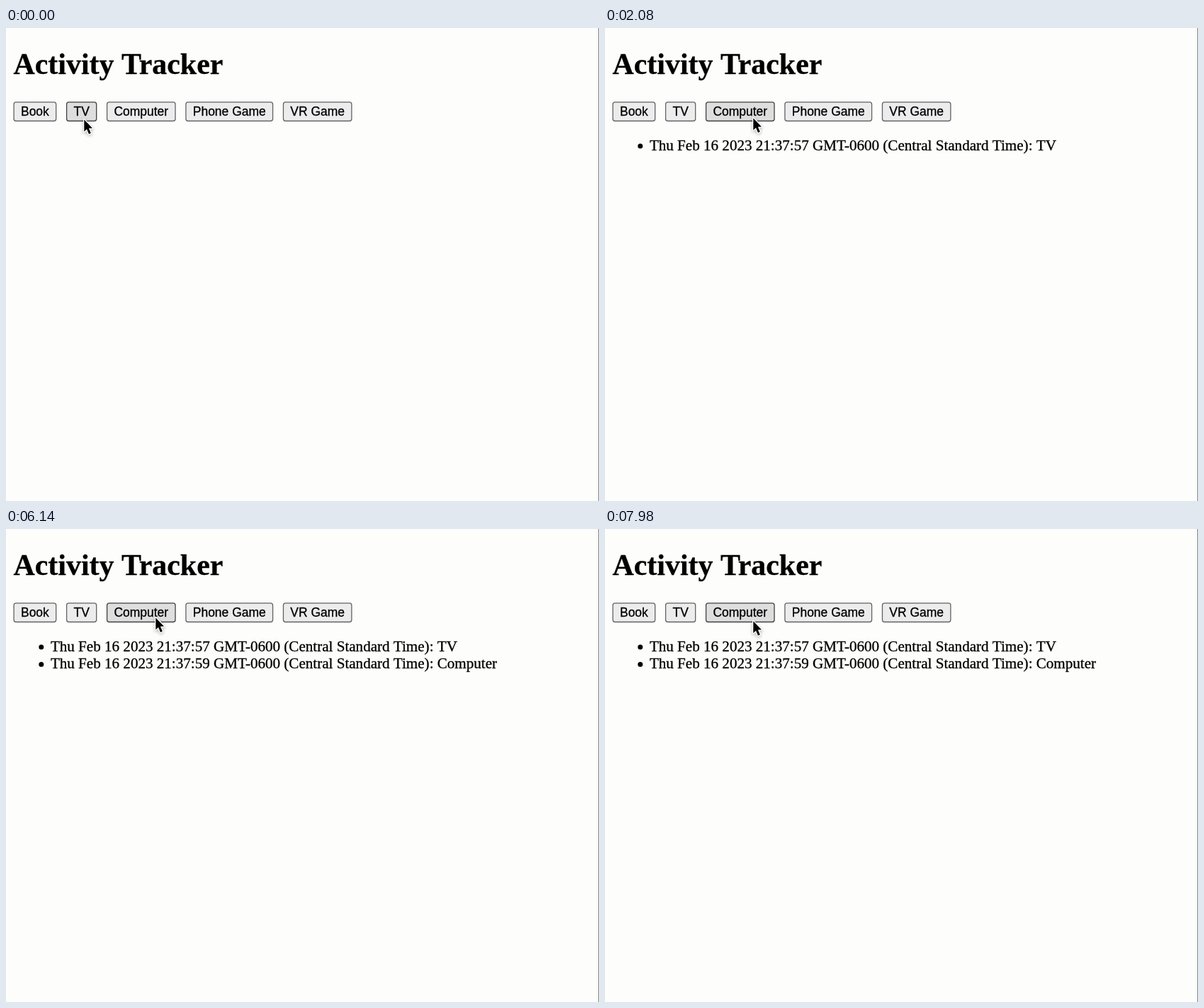
An HTML page with a canvas that plays this animation: 837x669 px, repeating every 8000 ms.

```html
<!DOCTYPE html>
<html lang="en">
<head>
<meta charset="utf-8">
<title>Activity Tracker</title>
<style>
  html, body { margin: 0; width: 100%; height: 100%; overflow: hidden; background: #fdfdfb; }
  canvas { display: block; }
</style>
</head>
<body>
<canvas id="stage" width="837" height="669"></canvas>
<script>
const ctx = document.getElementById('stage').getContext('2d');
const LOOP = 8000;
const SERIF = '"Liberation Serif", Times, serif';
const SANS = '"Liberation Sans", Arial, sans-serif';
const TITLE_FONT = `bold 41.9px ${SERIF}`;
const LIST_FONT = `21.09px ${SERIF}`;
const BUTTON_FONT = `17.47px ${SANS}`;
const BUTTON = { top: 104.3, height: 27.8, pad: 10.5, gap: 13.7 };

// Each press runs from down to up; the entry is logged on release.
const clicks = [
  { name: 'TV', clock: '21:37:57', down: 460, up: 620 },
  { name: 'Computer', clock: '21:37:59', down: 5700, up: 5860 }
];

// Pointer tip: time, x, y
const path = [
  [0, 110, 129.5], [20, 110, 129.5], [270, 110, 127.5], [1420, 110, 127.5],
  [2080, 209, 127.5], [2220, 211, 127.5], [3900, 211, 127.5],
  [4640, 211, 125.5], [7260, 211, 125.5], [7980, 209, 130.3], [LOOP, 209, 130.3]
];

ctx.font = BUTTON_FONT;
let left = 10.5;
const buttons = ['Book', 'TV', 'Computer', 'Phone Game', 'VR Game'].map(name => {
  const button = { name, x: left, width: ctx.measureText(name).width + 2 * BUTTON.pad };
  left += button.width + BUTTON.gap;
  return button;
});

const ease = p => p * p * (3 - 2 * p);

function pointerAt(t) {
  const i = Math.max(1, path.findIndex(key => key[0] > t));
  const [t0, x0, y0] = path[i - 1];
  const [t1, x1, y1] = path[i];
  const p = ease((t - t0) / (t1 - t0));
  return { x: x0 + (x1 - x0) * p, y: y0 + (y1 - y0) * p };
}

// A hairline outline gives the slightly heavier smoothed lettering.
function text(str, x, y, font) {
  ctx.font = font;
  ctx.fillStyle = ctx.strokeStyle = '#000';
  ctx.lineWidth = 0.3;
  ctx.fillText(str, x, y);
  ctx.strokeText(str, x, y);
}

function drawButton({ name, x, width }, pointer, t) {
  const over = pointer.x >= x && pointer.x <= x + width &&
    pointer.y <= BUTTON.top + BUTTON.height;
  const pressed = clicks.some(c => c.name === name && t >= c.down && t < c.up);
  ctx.beginPath();
  ctx.roundRect(x + 0.6, BUTTON.top + 0.6, width - 1.2, BUTTON.height - 1.2, 3);
  ctx.fillStyle = pressed ? '#f4f4f4' : over ? '#dedede' : '#ececec';
  ctx.fill();
  ctx.lineWidth = 1.3;
  ctx.strokeStyle = over ? '#404040' : '#626266';
  ctx.stroke();
  text(name, x + BUTTON.pad, 124.2, BUTTON_FONT);
}

function drawEntry({ name, clock }, row) {
  const y = 173 + row * 24.4;
  ctx.fillStyle = '#000';
  ctx.beginPath();
  ctx.arc(49.8, y - 6, 3.5, 0, Math.PI * 2);
  ctx.fill();
  text(`Thu Feb 16 2023 ${clock} GMT-0600 (Central Standard Time): ${name}`,
    62.9, y, LIST_FONT);
}

function drawPointer({ x, y }) {
  ctx.save();
  ctx.translate(x, y);
  const arrow = new Path2D('M0.3 0V17L4 13.5L7 20.5L9.8 19.3L6.9 12.3H12Z');
  ctx.lineWidth = 2.6;
  ctx.lineJoin = 'round';
  ctx.strokeStyle = '#fff';
  ctx.shadowColor = 'rgba(0,0,0,0.3)';
  ctx.shadowBlur = 4;
  ctx.shadowOffsetY = 1.5;
  ctx.stroke(arrow);
  ctx.shadowColor = 'transparent';
  ctx.fillStyle = '#000';
  ctx.fill(arrow);
  ctx.restore();
}

function draw(t) {
  const pointer = pointerAt(t);
  ctx.fillStyle = '#fdfdfb';
  ctx.fillRect(0, 0, 837, 669);
  ctx.fillStyle = '#858585';
  ctx.fillRect(836, 0, 1, 669);
  text('Activity Tracker', 10.5, 65, TITLE_FONT);
  buttons.forEach(button => drawButton(button, pointer, t));
  clicks.filter(c => t >= c.up).forEach(drawEntry);
  drawPointer(pointer);
}

function tick() {
  draw(performance.now() % LOOP);
  requestAnimationFrame(tick);
}
tick();
</script>
</body>
</html>
```
